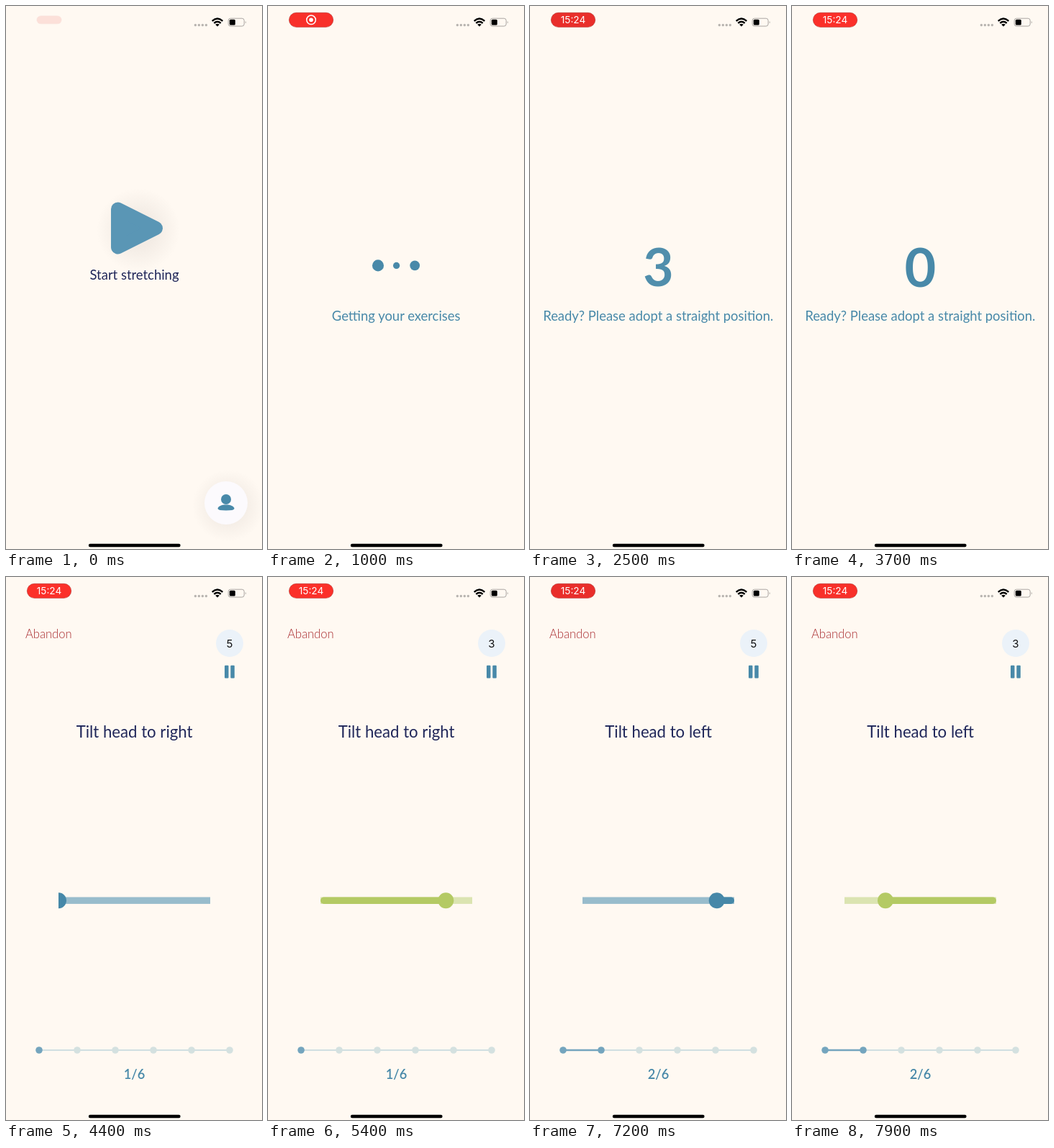
Write an HTML page that moves like this. It is 356x754 px and loops after 8000 ms.

```html
<!DOCTYPE html>
<html lang="en">
<head>
<meta charset="utf-8">
<title>Stretching session</title>
<style>
  html, body { margin: 0; width: 100%; height: 100%; overflow: hidden; background: #fff9f2; }
  svg { display: block; width: 100%; height: 100%; }
  text { font-family: Lato, "Open Sans", sans-serif; text-anchor: middle; }
  .body { font-size: 18.45px; fill: #4889a9; }
  .title { font-size: 22.2px; fill: #20275a; }
  .digits { font-family: Inter, Roboto, sans-serif; }
</style>
</head>
<body>
<svg viewBox="0 0 356 754" xmlns="http://www.w3.org/2000/svg">
  <defs>
    <radialGradient id="glow">
      <stop offset=".4" stop-color="#f3ece5"/>
      <stop offset="1" stop-color="#f3ece5" stop-opacity="0"/>
    </radialGradient>
    <clipPath id="barClip"><rect x="73" y="430" width="211" height="40"/></clipPath>
  </defs>
  <rect width="356" height="754" fill="#fff9f2"/>

  <g id="start">
    <circle cx="184" cy="311" r="58" fill="url(#glow)"/>
    <path d="M155.5 282 L208.5 308.5 L155.5 335 Z" fill="#5a96b5" stroke="#5a96b5" stroke-width="19" stroke-linejoin="round"/>
    <text class="body" x="178.5" y="380" style="fill:#20275a">Start stretching</text>
    <circle cx="309" cy="694" r="50" fill="url(#glow)"/>
    <circle cx="306" cy="690" r="30" fill="#fcfafd"/>
    <circle cx="306" cy="685" r="7" fill="#4889a9"/>
    <path d="M294.5 698 C294.5 690.5 317.5 690.5 317.5 698 Q317.5 700.5 306 700.5 T294.5 698" fill="#4889a9"/>
  </g>

  <g id="loading">
    <g id="pulse" fill="#4889a9"></g>
    <text class="body" x="178.2" y="437">Getting your exercises</text>
  </g>

  <g id="ready">
    <text id="count" y="27.2" font-size="75.5" font-weight="700" fill="#4889a9"></text>
    <text class="body" x="178.3" y="437">Ready? Please adopt a straight position.</text>
  </g>

  <g id="exercise">
    <text x="27" y="84.8" font-size="16.6" font-weight="300" fill="#a82a2e" style="text-anchor:start">Abandon</text>
    <circle cx="311" cy="92" r="19" fill="#ebf2f9"/>
    <text id="timer" class="digits" x="311" y="97.6" font-size="15" fill="#111"></text>
    <g fill="#4889a9">
      <rect x="304" y="122.8" width="5.5" height="17.6" rx="1"/>
      <rect x="312.3" y="122.8" width="5.5" height="17.6" rx="1"/>
    </g>
    <text id="move" class="title" x="178.6" y="223.3"></text>
    <g clip-path="url(#barClip)">
      <rect id="track" x="73" y="444.5" width="211" height="9.4"/>
      <line id="trail" y1="449.2" y2="449.2" stroke-width="9.4" stroke-linecap="round"/>
      <circle id="knob" cy="449.2" r="11"/>
    </g>
    <path d="M46 657H311" stroke="#d0dfe1" stroke-width="2.2"/>
    <path id="done" stroke="#74a5be" stroke-width="2.4"/>
    <g id="steps"></g>
    <text id="page" x="178.5" y="697" font-size="18.2" font-weight="600" fill="#4889a9"></text>
  </g>

  <g id="pill">
    <rect x="29.3" y="9.3" width="61.4" height="20" rx="10" id="pillBody" stroke="#b3302b" stroke-width=".6"/>
  </g>
  <g id="record" fill="none" stroke="#fff" stroke-width="1.5">
    <circle cx="60" cy="19.3" r="6.3"/>
    <circle cx="60" cy="19.3" r="2.8" fill="#fff" stroke="none"/>
  </g>
  <text id="clock" class="digits" x="60" y="24.2" font-size="13.6" fill="#fff">15:24</text>

  <path d="M263.3 26.5h.1m4.9 0h.1m4.9 0h.1m4.9 0h.1" stroke="#b9b5b1" stroke-width="3.4" stroke-linecap="round"/>
  <g fill="none" stroke="#000" stroke-width="2.4">
    <path d="M286.7 20.8Q294 14.4 301.3 20.8M289.3 23.8Q294 19.8 298.7 23.8"/>
    <path d="M291.2 25.8Q294 23.6 296.8 25.8L294 28.6Z" fill="#000" stroke="none"/>
  </g>
  <rect x="309.2" y="17.2" width="22" height="10.8" rx="3" fill="none" stroke="#aaa6a2"/>
  <path d="M332.8 21Q334.8 22.6 332.8 24.2Z" fill="#aaa6a2"/>
  <rect x="310.8" y="18.8" width="8" height="7.6" rx="1.5"/>
  <rect x="114.8" y="746.8" width="127.8" height="4.4" rx="2.2"/>
</svg>
<script>
const LOOP = 8000;
const NS = "http://www.w3.org/2000/svg";
const ui = Object.fromEntries([...document.querySelectorAll("[id]")].map(el => [el.id, el]));

const clamp = (v, lo = 0, hi = 1) => Math.min(hi, Math.max(lo, v));
const ramp = (t, from, to) => {
  const u = clamp((t - from) / (to - from));
  return u * u * (3 - 2 * u);
};
const mix = (a, b, u) => `rgb(${a.map((v, i) => Math.round(v + (b[i] - v) * u))})`;
const set = (el, attrs) => Object.entries(attrs).forEach(([k, v]) => el.setAttribute(k, v));

function circles(parent, count, attrs) {
  return Array.from({ length: count }, (_, i) => {
    const el = document.createElementNS(NS, "circle");
    set(el, attrs(i));
    return parent.appendChild(el);
  });
}
const pulseDots = circles(ui.pulse, 3, i => ({ cx: 153 + 25.6 * i, cy: 360.4 }));
const stepDots = circles(ui.steps, 6, i => ({ cx: 46 + 53 * i, cy: 657, r: 4.8 }));

const SCENES = [["start", 0, 700], ["loading", 700, 1650], ["ready", 1650, 4100], ["exercise", 4100, LOOP]];
const BLUE = [70, 136, 168], GREEN = [180, 202, 100];
const PALE_BLUE = [152, 188, 204], PALE_GREEN = [219, 228, 177];

// Bar positions grow from `origin` in direction `dir`.
const EXERCISES = [
  { name: "Tilt head to right", origin: 73, dir: 1, reach: 174.3, tick: 4250, out: [4500, 5150], back: [5800, 6300] },
  { name: "Tilt head to left", origin: 284, dir: -1, reach: 154, tick: 6830, out: [7000, 7800], back: [9000, 9500] }
];

function drawPill(t) {
  const grow = ramp(t, -90, 240);
  const dim = Math.max(0, Math.cos(2 * Math.PI * (t - 50) / 800)) ** 2;
  const size = 0.46 + 0.54 * grow;
  set(ui.pill, {
    transform: `translate(60 19.2) scale(${size}) translate(-60 -19.2)`,
    opacity: clamp(0.1 + 0.9 * ramp(t, -20, 240))
  });
  ui.pillBody.setAttribute("fill", mix([251, 48, 42], [230, 46, 43], dim));
  const clock = ramp(t, 1500, 1650);
  ui.record.setAttribute("opacity", ramp(t, 120, 260) * (1 - clock));
  ui.clock.setAttribute("opacity", clock);
}

function drawLoading(t) {
  pulseDots.forEach((dot, i) => {
    const phase = 2 * Math.PI * ((1000 - t) / 480 + 0.114 + i / 3);
    dot.setAttribute("r", 6.5 + 2 * Math.cos(phase));
  });
}

function drawCountdown(t) {
  const ticks = clamp((t - 1680) / 385, 0, 5.99);
  const number = 5 - Math.floor(ticks);
  const pop = ramp(ticks % 1, -0.1, 0.25);
  ui.count.textContent = number;
  set(ui.count, {
    transform: `translate(178.4 362.7) scale(${0.88 + 0.12 * pop})`,
    opacity: 0.82 + 0.18 * pop
  });
}

function drawExercise(t) {
  const index = t < 6700 ? 0 : 1;
  const { name, origin, dir, reach, tick, out, back } = EXERCISES[index];
  const peak = reach * ramp(t, ...out);
  const depth = peak * (1 - ramp(t, ...back));
  const good = ramp(depth, 90, 120);
  const color = mix(BLUE, GREEN, good);

  ui.move.textContent = name;
  ui.timer.textContent = clamp(5 - Math.floor((t - tick) / 390), 0, 5);
  ui.page.textContent = `${index + 1}/6`;
  ui.track.setAttribute("fill", mix(PALE_BLUE, PALE_GREEN, good));
  set(ui.trail, {
    x1: origin + dir * 4.7, x2: origin + dir * Math.max(4.7, peak),
    stroke: color, opacity: peak > 0 ? 1 : 0
  });
  set(ui.knob, { cx: origin + dir * depth, fill: color });
  ui.done.setAttribute("d", `M46 657h${53 * index}`);
  stepDots.forEach((dot, i) => dot.setAttribute("fill", i <= index ? "#74a5be" : "#d4e1e0"));
}

function draw(t) {
  SCENES.forEach(([id, from, to]) => {
    const shown = t >= from && t < to;
    ui[id].style.display = shown ? "" : "none";
    ui[id].setAttribute("opacity", from ? ramp(t, from - 30, from + 120) : 1);
  });
  drawPill(t);
  drawLoading(t);
  drawCountdown(t);
  drawExercise(t);
}

const began = performance.now();
function frame() {
  draw((performance.now() - began) % LOOP);
  requestAnimationFrame(frame);
}
frame();
</script>
</body>
</html>
```
